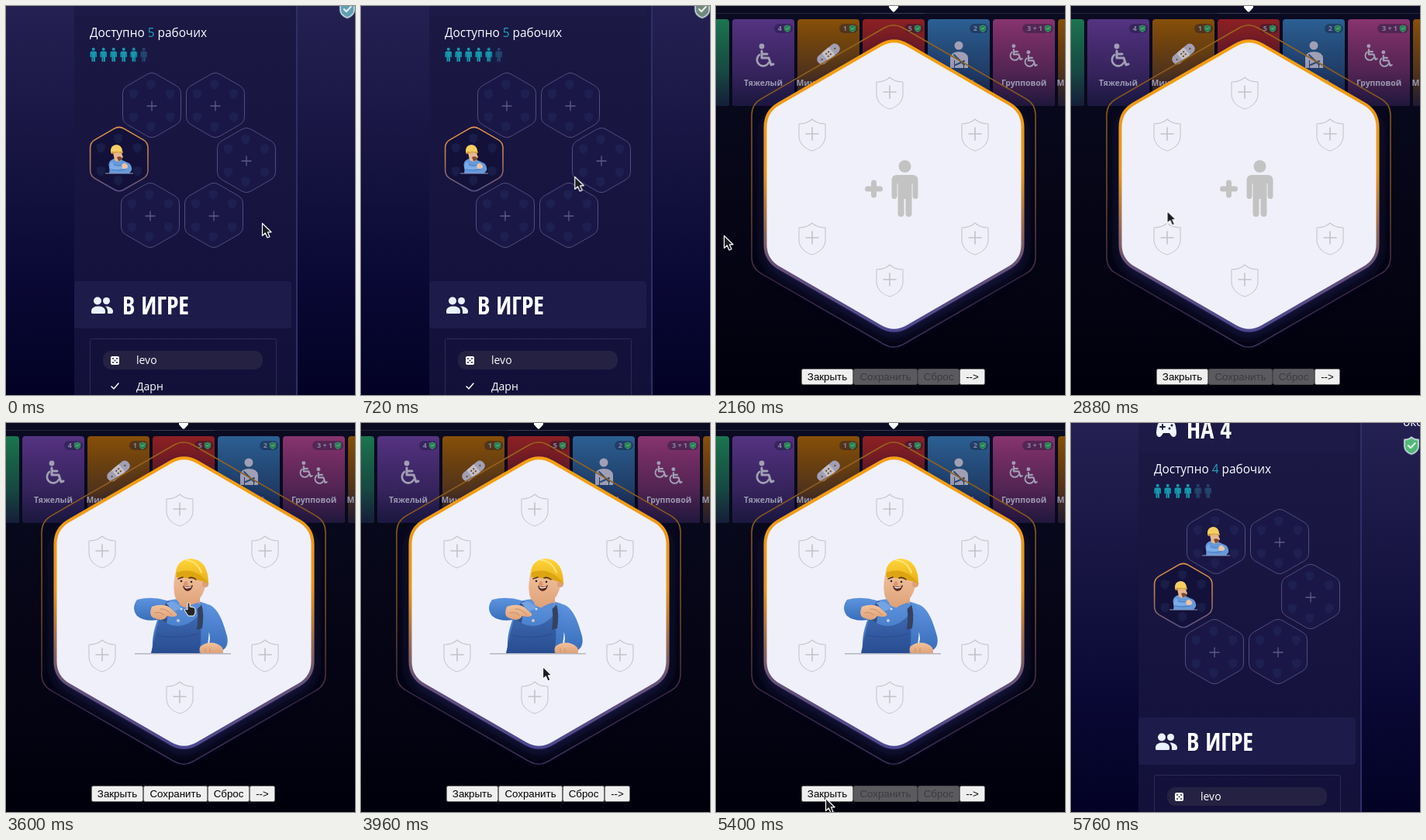
These frames come from a looping animation (450 by 502 pixels, 7560 ms). An HTML page:

```html
<!DOCTYPE html>
<html lang="ru">
<head>
<meta charset="utf-8">
<title>Рабочие</title>
<style>
html, body { margin: 0; width: 100%; height: 100%; overflow: hidden; background: #08062a; }
svg { display: block; }
text { font-family: "Open Sans", "Noto Sans", sans-serif; fill: #fff; }
.title { font: 700 32px "Open Sans Condensed", "Noto Sans Condensed", "Open Sans", sans-serif; font-stretch: 75%; }
.body { font-size: 15.4px; font-weight: 500; }
.name { font-size: 14px; font-weight: 500; }
.card { font-size: 10.4px; font-weight: 700; fill: #9b99b2; text-anchor: middle; }
.badge { font-size: 9px; font-weight: 700; fill: #8684a2; text-anchor: end; }
.btn { font: 13.333px "Liberation Sans", Arial, sans-serif; text-anchor: middle; fill: #000; }
.off { fill: #3b3b40; }

/* 21 ticks of 360 ms per loop */
.page, .early, .late, .modal, .empty, .man, .on, .arrow, .arrow path, .hand, .tint {
  animation: 7560ms step-end infinite;
}
.page { animation-name: scroll; }
.early { animation-name: early; }
.late { animation-name: late; }
.modal { animation-name: modal; }
.empty { animation-name: empty; }
.man { animation-name: man; }
.on { animation-name: enabled; }
.arrow { animation-name: move; }
.arrow path { animation-name: arrow; }
.hand { animation-name: hand; }
.tint { animation-name: tint; }
@keyframes scroll { 0% { transform: none } 28.5714%, 100% { transform: translate(-1px, 25px) } }
@keyframes early { 0% { opacity: 1 } 28.5714%, 100% { opacity: 0 } }
@keyframes late { 0% { opacity: 0 } 28.5714%, 100% { opacity: 1 } }
@keyframes modal { 0% { opacity: 0 } 28.5714% { opacity: 1 } 76.1904%, 100% { opacity: 0 } }
@keyframes empty { 0% { opacity: 1 } 47.619%, 100% { opacity: 0 } }
@keyframes man { 0% { opacity: 0 } 47.619%, 100% { opacity: 1 } }
@keyframes enabled { 0% { opacity: 0 } 47.619% { opacity: 1 } 66.6666%, 100% { opacity: 0 } }
@keyframes hand { 0% { opacity: 0 } 47.619% { opacity: 1 } 52.3809%, 100% { opacity: 0 } }
@keyframes arrow {
  0% { opacity: 1 } 47.619% { opacity: 0 } 52.3809% { opacity: 1 } 76.1904%, 100% { opacity: 0 }
}
@keyframes tint { 0% { fill: #5f9fb4 } 4.7619% { fill: #71897c } 28.5714%, 100% { fill: #52b878 } }
@keyframes move {
  0% { transform: translate(330px, 280px); animation-timing-function: steps(5) }
  23.8095% { transform: translate(193px, 130px) }
  28.5714% { transform: translate(10px, 296px); animation-timing-function: steps(4) }
  47.619% { transform: translate(237px, 232px); animation-timing-function: steps(3) }
  61.9047% { transform: translate(228px, 478px); animation-timing-function: steps(2) }
  71.4285%, 100% { transform: translate(141px, 484px) }
}
</style>
</head>
<body>
<script>
const rect = (x, y, w, h, fill, r = 0, more = '') =>
  `<rect x="${x}" y="${y}" width="${w}" height="${h}" rx="${r}" fill="${fill}" ${more}/>`;
const path = (d, fill = 'none', more = '') => `<path d="${d}" fill="${fill}" ${more}/>`;
const line = (d, color, width, more = '') =>
  path(d, 'none', `stroke="${color}" stroke-width="${width}" stroke-linecap="round" stroke-linejoin="round" ${more}`);
const dot = (x, y, r, fill) => `<circle cx="${x}" cy="${y}" r="${r}" fill="${fill}"/>`;
const text = (x, y, cls, s) => `<text x="${x}" y="${y}" class="${cls}">${s}</text>`;
const group = (cls, ...parts) => `<g class="${cls}">${parts.join('')}</g>`;
const at = (x, y, s, ...parts) => `<g transform="translate(${x} ${y}) scale(${s})">${parts.join('')}</g>`;
const use = (id, x, y, s = 1, more = '') =>
  `<use href="#${id}" transform="translate(${x} ${y}) scale(${s})" ${more}/>`;
const fade = (id, ...stops) => `<linearGradient id="${id}" x2="0" y2="1">` +
  stops.map(([o, c]) => `<stop offset="${o}" stop-color="${c}"/>`).join('') + '</linearGradient>';

// Pointy-top hexagon with rounded corners
function hex(cx, cy, half, round) {
  const R = half / Math.cos(Math.PI / 6), k = round / R;
  const p = [...Array(6)].map((_, i) => {
    const a = Math.PI / 3 * i - Math.PI / 2;
    return [cx + R * Math.cos(a), cy + R * Math.sin(a)];
  });
  const mix = (a, b) => a.map((v, i) => (v + (b[i] - v) * k).toFixed(2));
  return p.map((v, i) => {
    const before = mix(v, p[(i + 5) % 6]), after = mix(v, p[(i + 1) % 6]);
    return `${i ? 'L' : 'M'}${before}Q${v.map(n => n.toFixed(2))} ${after}`;
  }).join('') + 'z';
}

const SHIELD = 'M0-20C-5-15-11-14-17-14V2C-17 11-10 18 0 21C10 18 17 11 17 2V-14C11-14 5-15 0-20z';
const SLOTS = [[-5, -120], [-105, -66], [105, -66], [-105, 68], [105, 68], [-5, 122]];

const worker = [
  path('M256 233C271 234 279 252 285 275Q288 289 278 294L262 285Q266 272 255 258z', 'url(#shirt)'),
  path('M202 231Q228 222 258 233Q266 258 258 297H190Q186 278 196 252z', 'url(#shirt)'),
  path('M198 250Q207 262 222 262Q238 261 249 247Q254 272 249 297H187Q192 272 198 250z', 'url(#denim)'),
  path('M245 232L252 234Q256 246 253 265L246 267Q249 246 245 232z', '#344260'),
  path('M199 253L205 231L211 230L207 258z', '#344f86'),
  line('M195 274Q220 280 248 272', '#28498a', .8),
  path('M220 218H250V233Q240 244 224 235z', '#dba27b'),
  path('M219 192Q215 207 217 220Q219 233 234 236Q249 233 255 217L260 201Q252 188 219 192z', 'url(#skin)'),
  dot(257, 208, 4, '#dda079'),
  path('M219 199Q217 177 238 175Q261 176 261 208Q250 195 219 199z', 'url(#helmet)'),
  path('M220 193Q243 184 262 208Q250 201 220 199z', '#dda413'),
  line('M232 177Q246 178 252 193', '#ffe374', 2),
  line('M222 201L228 199M236 200Q240 198 245 202', '#553422', 1.6),
  dot(226, 204, 1.3, '#2b211f') + dot(239, 205, 1.3, '#2b211f'),
  path('M231 204Q226 211 232 211Q237 210 233 204z', '#dc9670'),
  path('M228 210Q235 213 241 209Q240 216 234 217Q229 216 228 210z', '#572623'),
  path('M229.5 211Q235 213 239.5 210.5L238 212.5Q233 214 231 213z', '#fff'),
  path('M214 230Q222 232 226 239L217 243L206 232z', '#74a3e3'),
  path('M247 232Q235 235 230 241L241 245L253 234z', '#5a8dd6'),
  path('M207 229Q188 223 169 228Q161 239 169 249Q180 258 202 253L204 238L188 237Q205 242 207 229z', 'url(#shirt)'),
  path('M188 237Q202 232 211 238L220 246Q222 250 214 250L208 249Q203 257 192 252Q183 250 188 237z', 'url(#skin)'),
  line('M199 240Q207 239 214 248M192 245Q199 243 204 248', '#c98964', 1),
  path('M251 288Q261 281 272 285Q281 288 280 297H251Q248 292 251 288z', 'url(#skin)'),
  line('M257 291V296M263 291V296', '#c98964', .8),
  dot(222, 255, 2, '#c6cbd8') + dot(226, 240, 1.5, '#d6e0f2'),
  rect(166, 297, 124, 1.5, '#b5b5c0'),
].join('');

// Seated variant with folded arms, facing right
const seated = [
  path('M-9 0Q-3-3 4 1L13 5Q17 9 16 14L13 18H-13Q-12 14-13 10Q-15 3-9 0z', '#6699db'),
  path('M-9 3Q-14 7-12 12Q-5 15 4 12L3 8Q-4 9-7 7z', '#7badea'),
  line('M-10 13Q-2 15 8 13M-7 7Q-3 9 3 8', '#4977bb', .9),
  path('M-8-9H3L4-5Q6-3 4-2L3 1Q-1 4-6 1z', '#e8b78f'),
  path('M-3-3Q1-5 4-2Q3 2-1 2z', '#7c4a35'),
  path('M-11-9Q-12-18-4-19Q3-19 4-11L5-9Q-3-11-11-9z', '#f6cf62'),
  path('M-11-9Q-3-12 5-9L4-8Q-3-10-10-7z', '#dba741'),
  path('M3 8Q5 4 8 5L11 8Q12 11 8 12L4 12z', '#eec3a2'),
  rect(-18, 17.5, 36, 1, '#8f9cc0'),
].join('');

const wheelchair = dot(-3, -13, 3.4, 'currentColor') +
  line('M-3-7V2H6L9 11L12 10M-3-3H4', 'currentColor', 3) +
  line('M-6-2A8 8 0 1 0 6 8', 'currentColor', 2.6);

const defs = `<defs>
${fade('sky', [0, '#242152'], [.35, '#181543'], [.7, '#0a0834'], [1, '#030225'])}
${fade('panel', [0, '#1c1945'], [.5, '#171440'], [1, '#121039'])}
${fade('night', [0, '#0b0b22'], [.4, '#070719'], [1, '#00000c'])}
${fade('ring', [0, '#f5a010'], [.45, '#e6961c'], [.75, '#6a5374'], [1, '#4d4890'])}
${fade('thin', [0, '#9a641c'], [.5, '#744a22'], [.8, '#382542'], [1, '#3c2f58'])}
${fade('mini', [0, '#e4954a'], [.5, '#b57a51'], [1, '#585085'])}
${fade('dim', [0, 'rgba(8,8,28,0)'], [.6, 'rgba(18,18,50,.45)'], [1, 'rgba(20,20,55,.9)'])}
${fade('shirt', [0, '#5e94df'], [1, '#386dbb'])}
${fade('denim', [0, '#3d69b1'], [1, '#284c90'])}
${fade('skin', [0, '#f1c29d'], [1, '#dfa279'])}
${fade('helmet', [0, '#ffd63a'], [1, '#e7ab13'])}
<filter id="blur" x="-20%" y="-20%" width="140%" height="140%"><feGaussianBlur stdDeviation="9"/></filter>
<g id="worker">${worker}</g>
<g id="seated">${seated}</g>
<g id="chair">${wheelchair}</g>
<g id="person">${dot(0, -29, 8, 'currentColor')}${path(
  'M-10-18H10Q17-18 17-11V9Q17 13 14 13Q10 13 10 9V-7H9V32Q9 36 5 36Q1 36 1 32V13H-1V32Q-1 36-5 36Q-9 36-9 32V-7H-10V9Q-10 13-14 13Q-17 13-17 9V-11Q-17-18-10-18z', 'currentColor')}</g>
<g id="people">${dot(-5, -5.5, 5, '#e9f1ff')}${dot(6.5, -5.5, 4.5, '#e9f1ff')}${path(
  'M-13 10V7Q-12 1.5-4 1.5Q4 1.5 5 7V10Q5 11 3 11H-11Q-13 11-13 10zM8 11H13Q15 11 15 9V7Q13 1.5 5 1.5Q8 4 8 8z', '#e9f1ff')}</g>
</defs>`;

function cell(cx, cy, active) {
  const marks = SLOTS.map(([x, y]) =>
    path(SHIELD, '#24305f', `opacity=".4" transform="translate(${cx + x * .224} ${cy + y * .224}) scale(.32)"`)).join('');
  return path(hex(cx, cy, active ? 37.2 : 37.5, 7), active ? '#13113a' : '#1a1746',
    active ? 'stroke="url(#mini)" stroke-width="1.6"' : 'stroke="#514e7d" stroke-width="1"') + marks;
}
const plus = (x, y) => line(`M${x - 6.5} ${y}h13M${x} ${y - 6.5}v13`, '#5c5b86', 1.3, 'style="stroke-linecap:butt"');
const mini = (cx, cy) => use('seated', cx, cy);
const title = (y, s) => text(150, y, 'title', s);

function crew() {
  return [...Array(6)].map((_, i) => {
    const who = c => use('person', 112.7 + 13 * i, 63, .25, `color="${c}"`);
    return i === 4 ? group('early', who('#159aae')) + group('late', who('#24466e'))
      : who(i < 4 ? '#159aae' : '#24466e');
  }).join('');
}

const label = n => `Доступно <tspan fill="#1fa5bb">${n}</tspan> рабочих`;
const page = rect(0, 0, 450, 502, 'url(#sky)') + group('page',
  rect(88, -50, 287, 580, 'url(#panel)'),
  rect(374, -50, 2, 580, '#302e68'),
  rect(88, -50, 280, 63, '#1d1a48', 4),
  at(124, -17, 1,
    path('M-8-10H8Q12-9 13 4Q13 10 9 10Q7 10 4 5H-4Q-7 10-9 10Q-13 10-13 4Q-12-9-8-10z', '#f1f6ff'),
    line('M-8-3H-2M-5-6V0', '#1d1a48', 2), dot(4, -1, 1.5, '#1d1a48'), dot(7, -5, 1.5, '#1d1a48')),
  title(-5, 'НА 4'),
  `<text x="429" y="-21" class="body" font-weight="700">око</text>`,
  group('early', text(108, 40, 'body', label(5))),
  group('late', text(108, 40, 'body', label(4))),
  crew(),
  [[188, 128], [270, 128], [310, 199], [186, 270], [268, 270]].map(([x, y], i) =>
    cell(x, y) + (i ? plus(x, y + 1) : group('early', plus(x, y + 1)) + group('late', mini(x, y)))).join(''),
  cell(145.8, 197.6, true), mini(146, 198),
  rect(88, 355, 280, 61, '#1d1b49', 4),
  use('people', 123, 386),
  title(398, 'В ИГРЕ'),
  rect(108.5, 429.5, 240, 110, 'none', 2, 'stroke="#2c2a59"'),
  rect(125, 445, 206, 24, '#242142', 10),
  rect(135, 452, 11, 11, '#fff', 2),
  [[138, 455], [143, 455], [140.5, 457.5], [138, 460], [143, 460]].map(([x, y]) => dot(x, y, 1, '#242142')).join(''),
  text(168, 462, 'name', 'levo'),
  line('M136 491L139 494L145 487', '#fff', 1.5),
  text(168, 496, 'name', 'Дарн'),
  at(440, 4, .53, path(SHIELD, '#52b878', 'class="tint" stroke="#d5e6ea" stroke-width="3"'),
    line('M-8 0L-2 6L9-6', '#fff', 3.4))
);

const CARDS = [
  ['#1c7550', '', ''], ['#553383', 'Тяжелый', '4'], ['#875009', 'Минимальный', '1'],
  ['#8c2024', 'Средний', '5'], ['#2c6094', 'Легкий', '2'], ['#88346f', 'Групповой', '3 + 1'], ['#875009', 'Минимальный', '']
];
function card([color, name, count], i) {
  const x = -63 + 84 * i, w = count.length > 1 ? 40 : 24;
  return rect(x, 17, 80, 112, color, 4) + rect(x, 17, 80, 112, 'url(#dim)', 4) +
    text(x + 40, 103, 'card', name) +
    (count && rect(x + 78 - w, 23, w, 12, 'rgba(20,20,50,.4)', 6) + text(x + 64, 32, 'badge', count) +
      at(x + 71, 29, .22, path(SHIELD, '#22844f', 'stroke="#4c9e75" stroke-width="3"'), line('M-7 0L-2 5L8-5', '#a9c9b7', 4)));
}
const icons = `<g color="#a19fb5">${[
  use('chair', 62, 65),
  `<g transform="translate(145 62) rotate(-40)">${rect(-17, -6.5, 34, 13, '#a19fb5', 6)}${rect(-6, -6.5, 12, 13, '#c3bfc8', 1)}${
    [[-2, -2], [2, -2], [-2, 2], [2, 2], [-11, 0], [11, 0]].map(([x, y]) => dot(x, y, 1.1, '#6a4620')).join('')}</g>`,
  dot(313, 51, 5.5, '#a19fb5'),
  path('M302 80V67Q303 59 313 59Q324 59 325 67V80H320V70H307V80z', '#a19fb5'),
  path('M308 64H319V80H308z', '#a19fb5'),
  line('M307 63L320 76M320 71L309 76', '#294c75', 2),
  use('chair', 386, 61, .72), use('chair', 405, 69, .72)
].join('')}</g>`;

const BUTTONS = [[110.5, 66, 'Закрыть'], [177.5, 82, 'Сохранить', 1], [260.5, 53, 'Сброс', 1], [314.5, 32, '--&gt;']];
function button([x, w, s, toggles]) {
  const draw = (fill, edge, cls) => rect(x, 468.5, w, 20, fill, 2, `stroke="${edge}"`) + text(x + w / 2, 483, 'btn ' + cls, s);
  return toggles ? draw('#5b5b5f', '#47474b', 'off') + group('on', draw('#efefef', '#707070', '')) : draw('#efefef', '#707070', '');
}

const modal = group('modal',
  rect(0, 0, 450, 502, 'url(#night)'),
  rect(0, 9, 450, 1, '#25253e') + rect(189, 9, 80, 1, '#3a3a55'),
  CARDS.map(card).join(''), icons,
  path('M223 0H235V2L230.5 7Q229 8.5 227.5 7L223 2z', '#fff'),
  path(hex(229.5, 240, 166, 20), '#24205c', 'filter="url(#blur)" opacity=".75"'),
  path(hex(229, 232.5, 183, 14), 'none', 'stroke="url(#thin)" stroke-width="1.6"'),
  path(hex(229.5, 232, 166, 20), '#f0f0fb', 'stroke="url(#ring)" stroke-width="4"'),
  SLOTS.map(([x, y]) => at(229 + x, 232 + y, 1,
    line(SHIELD, '#c6c6cc', 1.1), line('M-8-1H8M0-9V7', '#c2c2c8', 1.6))).join(''),
  group('empty', line('M195.5 236H211.5M203.5 228V244', '#c3c3c3', 7),
    use('person', 243.5, 236, 1, 'color="#c3c3c3"')),
  group('man', use('worker', 0, 0)),
  BUTTONS.map(button).join('')
);

const pointers = group('arrow', path('M.5.5V16.5L4.3 13L7 19L10 17.7L7.4 11.8H12z', '#1b1b20',
  'stroke="#fff" stroke-width="1.2" stroke-linejoin="round"')) +
  group('hand', path('M234 241V233Q235.5 230.5 237 233V237L242 238Q244 239 244 241V245L242 249H235L230.5 242Q230 239 234 241z',
    '#26262a', 'stroke="#fff" stroke-width="1" stroke-linejoin="round"'));

document.body.innerHTML =
  `<svg width="450" height="502" viewBox="0 0 450 502">${defs}${page}${modal}${pointers}</svg>`;
</script>
</body>
</html>
```
